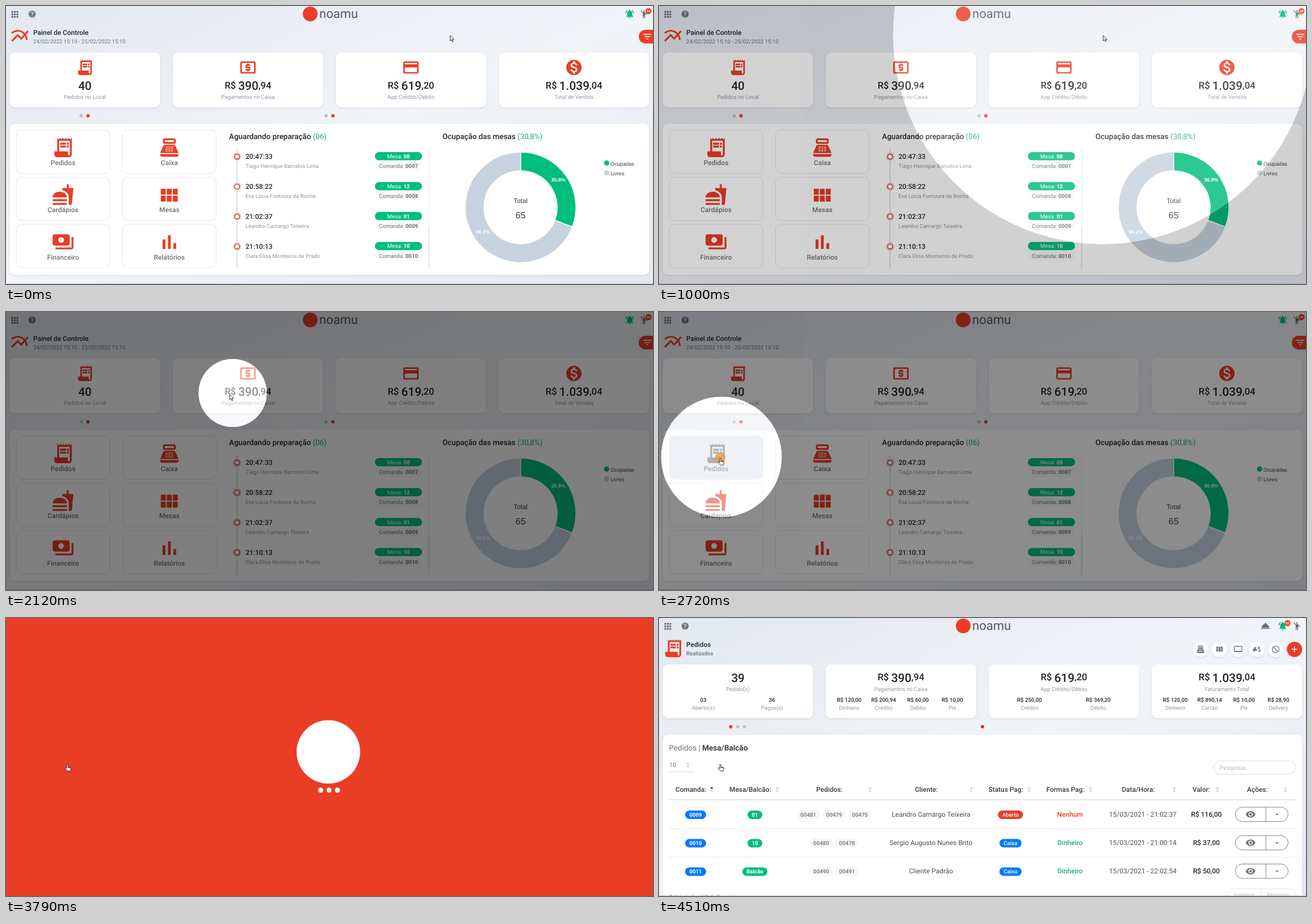
Write an HTML page that moves like this. It is 1140 by 491 pixels and loops after 4.77 s.

```html
<!DOCTYPE html>
<html lang="pt-BR">
<head>
<meta charset="utf-8">
<title>Painel de Controle</title>
<style>
html, body { margin: 0; width: 100%; height: 100%; overflow: hidden; background: #e8edf3; }
svg { display: block; width: 100vw; height: 100vh; font-family: Roboto, "Noto Sans", sans-serif; text-rendering: geometricPrecision; }
.chart { font-family: "Liberation Sans", Arial, sans-serif; }
</style>
</head>
<body>
<svg id="stage" viewBox="0 0 1140 491" xmlns="http://www.w3.org/2000/svg"></svg>
<script>
const RED = '#ea3d26', GREEN = '#00be7c', BLUE = '#007bff', GREY = '#6c757d', SOFT = '#92979c', INK = '#212529';

const ICONS = {
  receipt: 'M19.5 3.5L18 2l-1.5 1.5L15 2l-1.5 1.5L12 2l-1.5 1.5L9 2 7.5 3.5 6 2v14H3v3c0 1.66 1.34 3 3 3h12c1.66 0 3-1.34 3-3V2zM19 19c0 .55-.45 1-1 1s-1-.45-1-1v-3H8V5h11zM9 7h6v2H9zM16 7h2v2h-2zM9 10h6v2H9zM16 10h2v2h-2z',
  cash: 'M11 17h2v-1h1c.55 0 1-.45 1-1v-3c0-.55-.45-1-1-1h-3v-1h4V8h-2V7h-2v1h-1c-.55 0-1 .45-1 1v3c0 .55.45 1 1 1h3v1H9v2h2zM20 4H4c-1.1 0-2 .9-2 2v12c0 1.1.9 2 2 2h16c1.1 0 2-.9 2-2V6c0-1.1-.9-2-2-2zm0 14H4V6h16z',
  card: 'M20 4H4c-1.1 0-2 .9-2 2v12c0 1.1.9 2 2 2h16c1.1 0 2-.9 2-2V6c0-1.1-.9-2-2-2zm0 14H4v-6h16zm0-10H4V6h16z',
  coin: 'M12 2C6.48 2 2 6.48 2 12s4.48 10 10 10 10-4.48 10-10S17.52 2 12 2zm1.41 16.09V20h-2.67v-1.93c-1.71-.36-3.16-1.46-3.27-3.4h1.96c.1 1.05.82 1.87 2.65 1.87 1.96 0 2.4-.98 2.4-1.59 0-.83-.44-1.61-2.67-2.14-2.48-.6-4.18-1.62-4.18-3.67 0-1.72 1.39-2.84 3.11-3.21V4h2.67v1.95c1.86.45 2.79 1.86 2.85 3.39H14.3c-.05-1.11-.64-1.87-2.22-1.87-1.5 0-2.4.68-2.4 1.64 0 .84.65 1.39 2.67 1.91s4.18 1.39 4.18 3.91c-.01 1.83-1.38 2.83-3.12 3.16z',
  till: 'M17 2H7c-1.1 0-2 .9-2 2v2c0 1.1.9 2 2 2h10c1.1 0 2-.9 2-2V4c0-1.1-.9-2-2-2zm0 4H7V4h10zM20 22H4c-1.1 0-2-.9-2-2v-1h20v1c0 1.1-.9 2-2 2zM18.5 10.2C18.2 9.5 17.5 9 16.7 9H7.3c-.8 0-1.5.5-1.8 1.2L2 18h20z'
    + [11, 13, 15].map(y => [8, 11, 14].map(x => `M${x} ${y}h2v1h-2z`).join('')).join(''),
  food: 'M18.06 23h1.66c.84 0 1.53-.64 1.63-1.46L23 5.05h-5V1h-1.97v4.05h-4.97l.3 2.34c1.71.47 3.31 1.32 4.27 2.26 1.44 1.42 2.43 2.89 2.43 5.29zM1 22v-1h15v1c0 .55-.45 1-1 1H2c-.55 0-1-.45-1-1zM16 15C16 7 1 7 1 15zM1 17h15v2H1z',
  tables: 'M4 5h5v6H4zM4 12h5v6H4zM10 12h5v6h-5zM16 12h5v6h-5zM10 5h5v6h-5zM16 5h5v6h-5z',
  notes: 'M19 14V6c0-1.1-.9-2-2-2H3c-1.1 0-2 .9-2 2v8c0 1.1.9 2 2 2h14c1.1 0 2-.9 2-2zm-9-1c-1.66 0-3-1.34-3-3s1.34-3 3-3 3 1.34 3 3-1.34 3-3 3zm13-6v11c0 1.1-.9 2-2 2H4v-2h17V7z',
  bars: 'M5 9.2h3V19H5zM10.6 5h2.8v14h-2.8zM16.2 13H19v6h-2.8z',
  lines: 'M22 6.92l-1.41-1.41-2.85 3.21C15.68 6.4 12.83 5 9.61 5 6.72 5 4.07 6.16 2 8l1.42 1.42C5.12 7.93 7.27 7 9.61 7c2.74 0 5.09 1.26 6.77 3.24l-2.88 3.24-4-4L2 17l1.5 1.5 6-6 4 4 4.05-4.55c.75 1.35 1.25 2.9 1.44 4.55H21c-.22-2.3-.95-4.39-2.04-6.14z',
  help: 'M12 2C6.48 2 2 6.48 2 12s4.48 10 10 10 10-4.48 10-10S17.52 2 12 2zm1 17h-2v-2h2zm2.07-7.75l-.9.92C13.45 12.9 13 13.5 13 15h-2v-.5c0-1.1.45-2.1 1.17-2.83l1.24-1.26c.37-.36.59-.86.59-1.41 0-1.1-.9-2-2-2s-2 .9-2 2H8c0-2.21 1.79-4 4-4s4 1.79 4 4c0 .88-.36 1.68-.93 2.25z',
  bell: 'M7.58 4.08L6.15 2.65C3.75 4.48 2.17 7.3 2.03 10.5h2c.15-2.65 1.51-4.97 3.55-6.42zm12.39 6.42h2c-.15-3.2-1.73-6.02-4.12-7.85l-1.42 1.43c2.02 1.45 3.39 3.77 3.54 6.42zM18 11c0-3.07-1.64-5.64-4.5-6.32V4c0-.83-.67-1.5-1.5-1.5s-1.5.67-1.5 1.5v.68C7.63 5.36 6 7.92 6 11v5l-2 2v1h16v-1l-2-2zM10 20h4c0 1.1-.9 2-2 2s-2-.9-2-2z',
  person: 'M10 4a2 2 0 1 0 4 0a2 2 0 1 0-4 0zM15.89 8.11C15.5 7.72 14.83 7 13.53 7H11C8.24 7 6 4.75 6 2H4c0 3.16 2.11 5.84 5 6.71V22h2v-6h2v6h2V10.05L18.95 14l1.41-1.41z',
  filter: 'M10 16h4v2h-4zM3 6h18v2H3zM6 11h12v2H6z',
  dish: 'M2 17h20v2H2zM13.84 7.79c.1-.24.16-.51.16-.79 0-1.1-.9-2-2-2s-2 .9-2 2c0 .28.06.55.16.79C6.25 8.6 3.27 11.93 3 16h18c-.27-4.07-3.25-7.4-7.16-8.21z',
  screen: 'M21 3H3c-1.1 0-2 .9-2 2v12c0 1.1.9 2 2 2h18c1.1 0 2-.9 2-2V5c0-1.1-.9-2-2-2zm0 13H3V5h18z',
  moped: 'M15 5h4v5l2 3h-2l-3-4-3 6H8a3 3 0 0 1-6 0H1c0-4 2-6 5-6h4v4h2l3-5zM5 6h5v2H5zM16 16a3 3 0 1 0 6 0a3 3 0 1 0-6 0zM18 16a1 1 0 1 0 2 0a1 1 0 1 0-2 0z',
  block: 'M2 12a10 10 0 1 0 20 0a10 10 0 1 0-20 0zM5.7 7.1A8 8 0 0 0 16.9 18.3zM7.1 5.7A8 8 0 0 1 18.3 16.9z',
  plus: 'M19 13h-6v6h-2v-6H5v-2h6V5h2v6h6z',
  eye: 'M12 4.5C7 4.5 2.73 7.61 1 12c1.73 4.39 6 7.5 11 7.5s9.27-3.11 11-7.5c-1.73-4.39-6-7.5-11-7.5zM12 17c-2.76 0-5-2.24-5-5s2.24-5 5-5 5 2.24 5 5-2.24 5-5 5zm0-8c-1.66 0-3 1.34-3 3s1.34 3 3 3 3-1.34 3-3-1.34-3-3-3z'
};

const icon = (name, cx, cy, size, fill = RED) =>
  `<path d="${ICONS[name]}" fill="${fill}" fill-rule="evenodd" transform="translate(${cx - size / 2} ${cy - size / 2}) scale(${size / 24})"/>`;
const text = (x, y, str, size, fill = INK, weight = 400, anchor = 'middle') =>
  `<text x="${x}" y="${y}" font-size="${size}" fill="${fill}" font-weight="${weight}" text-anchor="${anchor}">${str}</text>`;
const left = (x, y, str, size, fill, weight) => text(x, y, str, size, fill, weight, 'start');
const box = (x, y, w, h, r, fill, extra = '') => `<rect x="${x}" y="${y}" width="${w}" height="${h}" rx="${r}" fill="${fill}" ${extra}/>`;
const dot = (x, y, r, fill, extra = '') => `<circle cx="${x}" cy="${y}" r="${r}" fill="${fill}" ${extra}/>`;
const line = (x1, y1, x2, y2, stroke, w = 1) => `<path d="M${x1} ${y1}L${x2} ${y2}" stroke="${stroke}" stroke-width="${w}"/>`;
const pill = (x, y, w, str, fill, weight = 700) => box(x - w / 2, y - 7.5, w, 15, 7.5, fill) + text(x, y + 3.5, str, 9.7, '#fff', weight);
const SHADOW = 'filter="url(#shadow)"';
const cardX = i => 6.8 + 287.2 * i;
const mid = i => cardX(i) + 132.3;
const cards = h => [0, 1, 2, 3].map(i => box(cardX(i), 82, 264.6, h, 9, '#fff', SHADOW)).join('');
const money = (x, y, whole, cents) =>
  `<text x="${x}" y="${y}" text-anchor="middle" font-weight="500" fill="${INK}"><tspan font-size="16.6" dy="-2.5">R$ </tspan><tspan font-size="20.9" dy="2.5">${whole}</tspan><tspan font-size="16.6" dy="-2.5">,${cents}</tspan></text>`;
const badge = (x, n) => dot(x, 9, 5.3, RED) + text(x, 11, n, 5.5, '#fff', 700);

function header() {
  let s = box(0, 0, 1140, 491, 0, 'url(#sky)');
  for (let i = 0; i < 9; i++) s += box(9.6 + (i % 3) * 4.4, 8.8 + Math.floor(i / 3) * 4.4, 3, 3, 0, '#5f666d');
  return s + icon('help', 46, 14.3, 15, '#70767c')
    + dot(536, 14, 13, RED) + left(552, 21, 'noamu', 22, '#55585c', 400)
    + icon('bell', 1099, 14, 18, GREEN) + icon('person', 1124, 14.5, 17, '#666c72');
}

function dashboard() {
  let s = header() + badge(1132, '04')
    + icon('lines', 24.5, 53, 37)
    + left(48, 51, 'Painel de Controle', 11.9, INK, 500)
    + left(48, 66, '24/02/2022 15:10 - 25/02/2022 15:10', 9.65, GREY)
    + box(1115, 42, 50, 24, 12, RED, SHADOW) + icon('filter', 1130, 54, 19, '#fff')
    + cards(97);
  ['receipt', 'cash', 'card', 'coin'].forEach((n, i) => s += icon(n, mid(i), 108.5, 32.5));
  s += text(mid(0), 148, '40', 20.6, INK, 500) + money(mid(1), 148, '390', '94') + money(mid(2), 148, '619', '20') + money(mid(3), 148, '1.039', '04');
  ['Pedidos no Local', 'Pagamentos no Caixa', 'App Crédito/Débito', 'Total de Vendas'].forEach((n, i) => s += text(mid(i), 164, n, 9.67, SOFT));
  [132.5, 564].forEach(x => s += dot(x, 194, 3, '#bcc2c5') + dot(x + 12, 194, 3, RED));
  s += box(6.8, 208, 1126.2, 267, 9, '#fff', SHADOW);

  const tiles = [['receipt', 'Pedidos', 250, 41], ['till', 'Caixa', 250, 39], ['food', 'Cardápios', 333, 40],
    ['tables', 'Mesas', 335, 42], ['notes', 'Financeiro', 416.5, 40], ['bars', 'Relatórios', 417, 41]];
  tiles.forEach(([name, label, y, size], i) => {
    const x = 18.2 + (i % 2) * 187.3, top = 219 + Math.floor(i / 2) * 83.4;
    s += box(x, top, 164.8, 76.6, 9, '#fff', `stroke="#e1e5e9" ${i ? '' : 'id="tile"'}`)
      + `<g ${i ? '' : 'id="tileIcon"'}>${icon(name, x + 82.3 - (name == 'tables'), y, size, i ? RED : 'currentColor')}</g>`
      + text(x + 82.3, top + 62, label, 12, GREY, 500);
  });

  s += left(393, 235, `Aguardando preparação <tspan font-weight="400" fill="#17b07b">(06)</tspan>`, 13.4, INK, 500)
    + left(769, 235, `Ocupação das mesas <tspan font-weight="400" fill="#17b07b">(30,8%)</tspan>`, 13.4, INK, 500)
    + line(407.2, 253, 407.2, 464, '#dedede', 2) + line(744.8, 252, 744.8, 464, '#f1f1f1', 2) + line(744.8, 390, 744.8, 464, '#e6e6e6', 2);
  const queue = [['20:47:33', 'Tiago Henrique Barcelos Lima', '08', '0007'], ['20:58:22', 'Eva Lúcia Fontoura da Rocha', '12', '0008'],
    ['21:02:37', 'Leandro Camargo Teixeira', '01', '0009'], ['21:10:13', 'Clara Elisa Monteiros de Prado', '10', '0010']];
  queue.forEach(([time, who, table, tab], i) => {
    const y = 265.5 + 52.9 * i;
    s += dot(407.2, y + .5, 7.5, '#dcdcdc') + dot(407.2, y + .5, 4.4, '#fff', `stroke="${RED}" stroke-width="1.6"`)
      + left(422, y + 4.5, time, 12.1, INK, 500) + left(422, y + 20.3, who, 9.65, SOFT)
      + box(650, y - 7.5, 83, 14.5, 7.2, GREEN) + text(691.7, y + 3.2, `Mesa: <tspan font-weight="700">${table}</tspan>`, 9.7, '#fff')
      + box(650, y + 9.5, 83, 15, 7.5, '#f8f9fa') + text(691.7, y + 20.3, `Comanda: <tspan font-weight="700">${tab}</tspan>`, 9.7, GREY);
  });

  const at = (r, a) => `${906.7 + r * Math.sin(a)} ${355.5 - r * Math.cos(a)}`;
  const slice = (a, b, fill) => {
    const big = b - a > Math.PI ? 1 : 0;
    return `<path d="M${at(97.5, a)}A97.5 97.5 0 ${big} 1 ${at(97.5, b)}L${at(64.5, b)}A64.5 64.5 0 ${big} 0 ${at(64.5, a)}z" fill="${fill}" stroke="#fff" stroke-width="1.5"/>`;
  };
  const cut = Math.PI * 2 * .308;
  return s + slice(0, cut, GREEN) + slice(cut, Math.PI * 2, '#c6d2e0')
    + `<g class="chart">` + text(973, 310, '30.8%', 8.9, '#fff', 700) + text(840, 402, '69.2%', 8.9, '#fff', 700)
    + text(906.7, 348, 'Total', 11.7, '#373d3f') + text(906.7, 375, '65', 15.9, '#373d3f')
    + dot(1058.3, 277.3, 4.6, GREEN) + left(1065, 281.5, 'Ocupadas', 9.2, '#373d3f')
    + dot(1058.3, 294.7, 4.6, '#c6d2e0') + left(1065, 299, 'Livres', 9.2, '#373d3f') + '</g>';
}

const sorter = (x, y, up = '#c3c8cd') => `<path d="M${x - 3} ${y - 1.5}h6l-3-3z" fill="${up}"/><path d="M${x - 3} ${y + 1.5}h6l-3 3z" fill="#c3c8cd"/>`;

function orders() {
  let s = header() + badge(1107.5, '02') + icon('dish', 1068.5, 14, 18, '#666c72')
    + icon('receipt', 25, 53.5, 37.5)
    + left(48, 51, 'Pedidos', 11.9, INK, 500) + left(48, 66, 'Realizados', 9.7, GREY, 500);
  ['till', 'tables', 'screen', 'moped', 'block', 'plus'].forEach((n, i) => {
    const x = 954.2 + 33.1 * i, last = i == 5;
    s += dot(x, 55.3, 13.4, last ? RED : '#fff', SHADOW) + icon(n, x, 55.3, last ? 17 : 16, last ? '#fff' : GREY);
  });
  s += cards(95) + text(mid(0), 112.5, '39', 20.6, INK, 500)
    + money(mid(1), 112.5, '390', '94') + money(mid(2), 112.5, '619', '20') + money(mid(3), 112.5, '1.039', '04');
  ['Pedido(s)', 'Pagamentos no Caixa', 'App Crédito/Débito', 'Faturamento Total'].forEach((n, i) => s += text(mid(i), 128.5, n, 9.67, SOFT));
  const parts = [[78, '03', 'Aberto(s)'], [199, '36', 'Pagos(s)'],
    [335, 'R$ 120,00', 'Dinheiro'], [395.7, 'R$ 200,94', 'Crédito'], [456.3, 'R$ 60,00', 'Débito'], [517, 'R$ 10,00', 'Pix'],
    [652.7, 'R$ 250,00', 'Crédito'], [774, 'R$ 369,20', 'Débito'],
    [909.6, 'R$ 120,00', 'Dinheiro'], [970.3, 'R$ 890,14', 'Cartão'], [1030.8, 'R$ 10,00', 'Pix'], [1091.4, 'R$ 28,90', 'Delivery']];
  parts.forEach(([x, sum, label]) => s += text(x, 148.3, sum, 9.7, INK, 500) + text(x, 162, label, 9.67, SOFT));
  s += dot(126.5, 192, 3, RED) + dot(138.6, 192, 3, '#bcc2c5') + dot(150.7, 192, 3, '#bcc2c5') + dot(570, 192, 3, '#cf3a20')
    + box(6.8, 206, 1126.2, 310, 9, '#fff', SHADOW)
    + left(17.5, 233.5, `Pedidos | <tspan font-weight="500" fill="${INK}">Mesa/Balcão</tspan>`, 13.5, GREY)
    + left(18, 263, '10', 10.6, GREY) + sorter(51, 260) + line(18, 271.7, 63, 271.7, '#d5d9dd')
    + box(977, 252.3, 144.7, 23.5, 11.7, '#fff', 'stroke="#d5d9dd"') + left(988, 268, 'Pesquisar...', 10.3, '#b4bac0');
  const heads = [['Comanda:', 29, 93], ['Mesa/Balcão:', 124, 208.5], ['Pedidos:', 277, 372], ['Cliente:', 451, 550], ['Status Pag:', 580.5, 652],
    ['Formas Pag:', 682.5, 760.5], ['Data/Hora:', 815.5, 908], ['Valor:', 940, 984], ['Ações:', 1036, 1103.5]];
  heads.forEach(([label, x, sx], i) => s += left(x, 307, label, 11.9, '#343a40', 500) + sorter(sx, 303, i ? undefined : INK));
  s += line(18, 321, 1122, 321, '#d9dde1', 1.5) + line(18, 372, 1122, 372, '#e3e6e9') + line(18, 422.4, 1122, 422.4, '#e3e6e9');

  const rows = [
    ['0009', '01', 26, ['481', '479', '475'], 'Leandro Camargo Teixeira', 'Aberto', 'Nenhum', '21:02:37', '116'],
    ['0010', '10', 26, ['480', '478'], 'Sergio Augusto Nunes Brito', 'Caixa', 'Dinheiro', '21:00:14', '37'],
    ['0011', 'Balcão', 44, ['490', '491'], 'Cliente Padrão', 'Caixa', 'Dinheiro', '22:02:54', '50']];
  rows.forEach(([tab, table, w, ids, who, status, pay, time, sum], i) => {
    const y = 346.8 + 50.2 * i, open = i == 0;
    s += pill(64.5, y + .7, 37, tab, BLUE) + pill(169, y + .7, w, table, GREEN);
    ids.forEach((id, k) => {
      const x = 308.5 + 45.5 * (k - (ids.length - 1) / 2);
      s += box(x - 20.5, y - 7.5, 41, 16, 8, '#f5f6f8') + text(x, y + 4.2, '00' + id, 9.8, GREY, 500);
    });
    s += text(479.3, y + 4, who, 11.95, '#4a5056')
      + pill(619.3, y + .7, open ? 44 : 39, status, open ? RED : BLUE, 500)
      + text(724.3, y + 4, pay, 12, open ? RED : '#17b07b', 500)
      + text(852.5, y + 4, '15/03/2021 - ' + time, 11.95, '#4a5056')
      + text(964.5, y + 4, `R$ ${sum},00`, 12, INK, 500)
      + box(1015.5, y - 12.7, 93, 25.4, 12.7, '#fff', `stroke="${GREY}" stroke-width=".9"`) + line(1069.3, y - 12.7, 1069.3, y + 12.7, GREY, .9)
      + icon('eye', 1042.3, y, 18.5, GREY) + `<path d="M1086 ${y - 1}h6l-3 3z" fill="${GREY}"/>`;
  });
  return s + left(18, 496, 'Exibindo 1 até 3 de 3 registros', 9.7, GREY)
    + box(1002, 478.5, 119, 30, 9, '#fff', 'stroke="#dfe3e6"') + line(1060.5, 478.5, 1060.5, 491, '#dfe3e6')
    + text(1031, 493, 'Anterior', 10.6, '#b4bac0') + text(1091, 493, 'Próximo', 10.6, '#b4bac0');
}

const stage = document.getElementById('stage');
stage.innerHTML = `<defs>
  <linearGradient id="sky" x1="0" y1="0" x2="1" y2="1"><stop offset="0" stop-color="#e3e8ef"/><stop offset=".5" stop-color="#f1f4f8"/><stop offset="1" stop-color="#e4e9f1"/></linearGradient>
  <filter id="shadow" x="-10%" y="-10%" width="120%" height="130%"><feDropShadow dx="0" dy="1.2" stdDeviation="1.8" flood-color="#44566c" flood-opacity=".17"/></filter></defs>
  <g id="dash">${dashboard()}</g><g id="list">${orders()}</g>
  ${box(0, 490, 1140, 1, 0, '#c4c9cf')}
  <g id="spot"><path id="shade" fill-rule="evenodd"/><circle id="glow" fill="#fff"/></g>
  <g id="loader">${box(0, 0, 1140, 491, 0, RED)}${dot(568, 236.5, 56, '#fff')}${[0, 1, 2].map(i => dot(0, 304, 4.5, '#fff', `id="d${i}"`)).join('')}</g>
  <circle id="click" r="9" fill="#f0953f"/>
  <g id="pointer" stroke="#222" stroke-width=".9" stroke-linejoin="round" fill="#fff">
    <path id="arrow" d="M0 0V9.6L2.2 7.6 3.8 11.1 5.3 10.4 3.8 7.1H6.6z"/>
    <path id="hand" d="M-1 1.6Q.1-.2 1.2 1.6V5.6L5.2 6.5Q6.7 7 6.4 8.6L5.4 13H.4L-3.6 8.6Q-3.8 7-2.2 7.4L-1 8.5zM1.2 5.6V7.6M3 6V7.8M4.7 6.4V8"/></g>`;

const $ = id => document.getElementById(id);
const set = (id, attrs) => { for (const k in attrs) $(id).setAttribute(k, attrs[k]); };
const show = (id, on) => $(id).style.display = on ? '' : 'none';
const clamp = v => Math.max(0, Math.min(1, v));

const LOOP = 4770;
// Stretches of motion: start, end, number of steps.
const BEATS = [[850, 1330, 8], [1510, 1990, 8], [2050, 2530, 8], [2610, 2610, 1], [2720, 3130, 6], [3200, 3200, 1], [3790, 4310, 9], [4380, 4510, 3]];
// Pointer route: time, x, y.
const ROUTE = [[1510, 782, 51], [1990, 483, 112], [2530, 132, 242], [2610, 110, 256]];

function snap(t) {
  let out = 0;
  for (const [a, b, n] of BEATS) {
    if (t < a) break;
    const step = n > 1 ? (b - a) / (n - 1) : 1;
    out = a + Math.min(n - 1, Math.floor((t - a) / step + 1e-6)) * step;
  }
  return out;
}

function route(t) {
  for (let i = 1; i < ROUTE.length; i++) {
    const [a, x, y] = ROUTE[i - 1], [b, x2, y2] = ROUTE[i];
    if (t < b) {
      const u = clamp((t - a) / (b - a));
      return [x + (x2 - x) * u, y + (y2 - y) * u];
    }
  }
  return ROUTE[ROUTE.length - 1].slice(1);
}

function draw(time) {
  const t = snap(time), loading = t >= 3790;
  show('dash', !loading);
  show('list', loading);

  const focus = t < 2000 ? clamp((t - 797) / 533) : 1 - clamp((t - 2669) / 531);
  const [x, y] = route(t), r = 541 - 481 * focus;
  show('spot', focus > 0);
  set('spot', { opacity: focus / 2 });
  set('shade', { d: `M0 0H1140V491H0zM${x - r} ${y}a${r} ${r} 0 1 0 ${2 * r} 0a${r} ${r} 0 1 0 ${-2 * r} 0z` });
  set('glow', { cx: x, cy: y, r });

  const [px, py] = t < 1510 ? [782.7, 51.5] : route(t + 8);
  const hover = px < 183;
  set('pointer', { transform: `translate(${hover ? px - 2 : px} ${py + (hover ? 1.3 : .5)})` });
  show('arrow', !hover);
  show('hand', hover);
  set('tile', { fill: hover ? '#e0e6ed' : '#fff' });
  set('tileIcon', { color: hover ? GREY : RED });

  const tap = t >= 2720 ? 1 - clamp((t - 2720) / 240) : 0;
  set('click', { cx: px - 2, cy: py + 1, opacity: tap * .8 });

  const veil = loading ? clamp(1 - (t - 3840) / 670) : 0;
  show('loader', veil > 0);
  set('loader', { opacity: veil });
  const sway = Math.sin(Math.PI * (t - 3790) / 780);
  for (let i = 0; i < 3; i++) set('d' + i, { cx: 554.5 + 14.8 * i - sway * (i ? 1.9 : .4) });
}

const begin = performance.now();
function tick() {
  draw((performance.now() - begin) % LOOP);
  requestAnimationFrame(tick);
}
tick();
</script>
</body>
</html>
```
